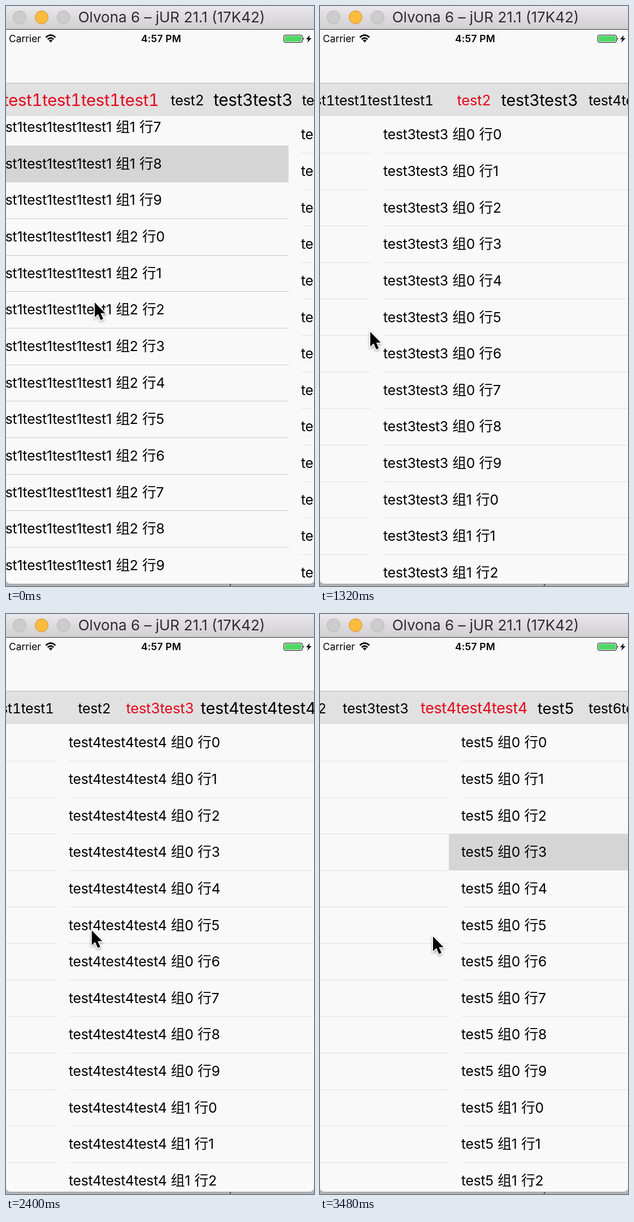
Animation, 545 px wide and 1027 px high, one loop 3.6 s. Source, as an HTML page:

```html
<!DOCTYPE html>
<html lang="zh-CN">
<head>
<meta charset="utf-8">
<title>Paged lists</title>
<style>
html, body { margin: 0; width: 100%; height: 100%; overflow: hidden; }
body {
  position: relative; background: #b4b4b4; color: #000;
  font: 24.7px/1 Inter, "Noto Sans CJK SC", "Noto Sans CJK", sans-serif;
  font-optical-sizing: none; white-space: nowrap;
}
body *, .row::after { position: absolute; box-sizing: border-box; }
#window {
  left: 0; top: 0; width: 545px; height: 1024px; overflow: hidden;
  background: #f9f9f9; border-radius: 0 0 7px 7px; border-bottom: 1px solid #999;
}
#tick { left: 396px; top: 1023px; width: 2px; height: 4px; background: #555; }
#title {
  width: 545px; height: 42px; border-bottom: 1px solid #333;
  background: linear-gradient(#e9e7e9, #d1cfd1);
}
#title span {
  left: 293px; top: 20px; transform: translate(-50%, -50%);
  font-size: 26px; color: #2e2e2e;
}
.light {
  top: 8px; width: 24px; height: 24px; border-radius: 50%;
  background: #cdcccd; border: 1px solid #b7b6b7;
}
.status { top: 58px; font-size: 17.4px; transform: translateY(-50%); }
#clock { left: 274.5px; font-weight: 600; letter-spacing: .2px; transform: translate(-50%, -50%); }
#icons { left: 0; top: 44px; }
#tabs {
  top: 136px; width: 545px; height: 59px; overflow: hidden;
  background: #e1e1e1; border-top: 1px solid #b6b6b6;
}
#strip { left: 0; top: 29.5px; }
.tab, .page { letter-spacing: -.23px; }
.tab { font-variant-numeric: tabular-nums; }
#lists { top: 195px; width: 545px; height: 829px; overflow: hidden; }
.page { left: 0; top: 0; width: 545px; height: 100%; }
.row { width: 545px; height: 64.66px; padding-left: 22px; line-height: 64.66px; word-spacing: .7px; }
.row::after { content: ""; left: 22px; right: 0; top: 100%; height: 1px; background: #e1e1e1; }
.page:first-child .row::after { background: #cbcbcb; }
.row.on { background: #d5d5d5; }
.row.on::after { background: none; }
#cursor { left: 0; top: 0; overflow: visible; filter: drop-shadow(0 2px 2px #0005); }
</style>
</head>
<body>
<div id="window">
  <div id="lists"></div>
  <div id="tabs"><div id="strip"></div></div>
  <div id="title">
    <i class="light" style="left:11.5px"></i>
    <i class="light" style="left:51px;background:#fdbb3d;border-color:#c8953c"></i>
    <i class="light" style="left:90px"></i>
    <span>Olvona 6 – jUR 21.1 (17K42)</span>
  </div>
  <span class="status" style="left:5px">Carrier</span>
  <span class="status" id="clock">4:57 PM</span>
  <svg id="icons" width="545" height="28">
    <path d="M70.5 11.5Q79 3.8 87.5 11.5M73.8 15Q79 10.3 84.2 15" fill="none" stroke="#000" stroke-width="2.6"/>
    <path d="M75.7 17Q79 14 82.3 17L79 20.5Z"/>
    <rect x="491.5" y="7.5" width="33" height="13" rx="2.5" fill="none" stroke="#111"/>
    <rect x="493" y="9" width="30" height="10" rx="1" fill="#4cd964"/>
    <path d="M526 11.5q2.4 2.5 0 5z"/>
    <path d="M537.5 7.5L531 15h4l-2 6 7.5-8h-4.2z"/>
  </svg>
</div>
<i id="tick"></i>
<svg id="cursor" width="20" height="33">
  <path d="M0 0V26L6 20.5L10.5 31L15 29L10.5 19H18.5Z" stroke="#fff" stroke-width="3" paint-order="stroke"/>
</svg>
<script>
const PAGE = 545, ROW = 64.66, STEP = 120, STEPS = 30, GLIDE = 2.54;
const repeats = [4, 1, 2, 3, 1, 2];
const centers = [133, 321, 437, 611, 756, 872];
const picked = { 0: 18, 4: 3 };

// each swipe turns one page along an S-curve; times are in steps
const swipes = [
  { mid: 1.131, speed: 2.129 },
  { mid: 10.074, speed: 1.75 },
  { mid: 18.792, speed: 1.3535 },
  { mid: 28.811, speed: 1.7456 }
];
// turning points of the pointer: step, x, y
const turns = [
  [0, 157, 525], [1, 130, 525], [6, 346, 525], [11, 89, 577],
  [16, 378, 582], [19.5, 148, 560], [25.6, 348, 571], [29, 200, 571]
];

const $ = id => document.getElementById(id);
const clamp = v => Math.max(0, Math.min(1, v));
const smooth = v => v * v * (3 - 2 * v);

function add(parent, cls, text = "") {
  const el = document.createElement("div");
  el.className = cls;
  el.textContent = text;
  return parent.appendChild(el);
}

const names = repeats.map((n, i) => `test${i + 1}`.repeat(n));
const tabs = names.map((name, i) => {
  const el = add($("strip"), "tab", name);
  el.style.left = centers[i] + "px";
  return el;
});
const pages = names.slice(0, 5).map((name, i) => {
  const page = add($("lists"), "page");
  const shift = i ? 0.2 : -1112.1;
  for (let r = 0; r < (i ? 13 : 30); r++) {
    const row = add(page, "row", `${name} 组${Math.floor(r / 10)} 行${r % 10}`);
    row.style.top = shift + r * ROW + "px";
    row.classList.toggle("on", picked[i] === r);
  }
  return page;
});

const scrollAt = step => swipes.reduce(
  (sum, s) => sum + PAGE / (1 + Math.exp(s.speed * (s.mid - step))), 0);

function pointerAt(step) {
  const k = Math.max(1, turns.findIndex(turn => turn[0] >= step));
  const a = turns[k - 1], b = turns[k];
  const f = smooth((step - a[0]) / (b[0] - a[0]));
  return [1, 2].map(i => a[i] + (b[i] - a[i]) * f);
}

function draw(step) {
  const scroll = scrollAt(step);
  pages.forEach((page, i) => {
    const x = Math.round(i * PAGE - scroll);
    page.style.transform = `translateX(${x}px)`;
    // a page loads once it is a few pixels in
    page.style.visibility = x > PAGE - 5 ? "hidden" : "visible";
  });

  // when a swipe has settled, its tab is selected and glides to the middle
  let selected = 0, offset = 0;
  swipes.forEach((s, i) => {
    const since = step - s.mid - 7.5 / s.speed;
    if (since < 0) return;
    selected = i + 1;
    offset += (centers[selected] - PAGE / 2 - offset) * smooth(clamp(since / GLIDE));
  });
  $("strip").style.transform = `translateX(${-offset}px)`;

  tabs.forEach((tab, i) => {
    // the third tab stays enlarged until its page starts to come in
    const near = i === 2 && scroll < PAGE + 1 ? 1 : clamp(1 - Math.abs(scroll / PAGE - i));
    tab.style.transform = `translate(-50%, -50%) scale(${1 + .2 * near})`;
    tab.style.color = i === selected ? "#e5071b" : "#000";
  });

  const [x, y] = pointerAt(step);
  $("cursor").style.transform = `translate(${x}px, ${y}px)`;
}

function tick() {
  draw(Math.floor(performance.now() / STEP) % STEPS);
  requestAnimationFrame(tick);
}
tick();
</script>
</body>
</html>
```
